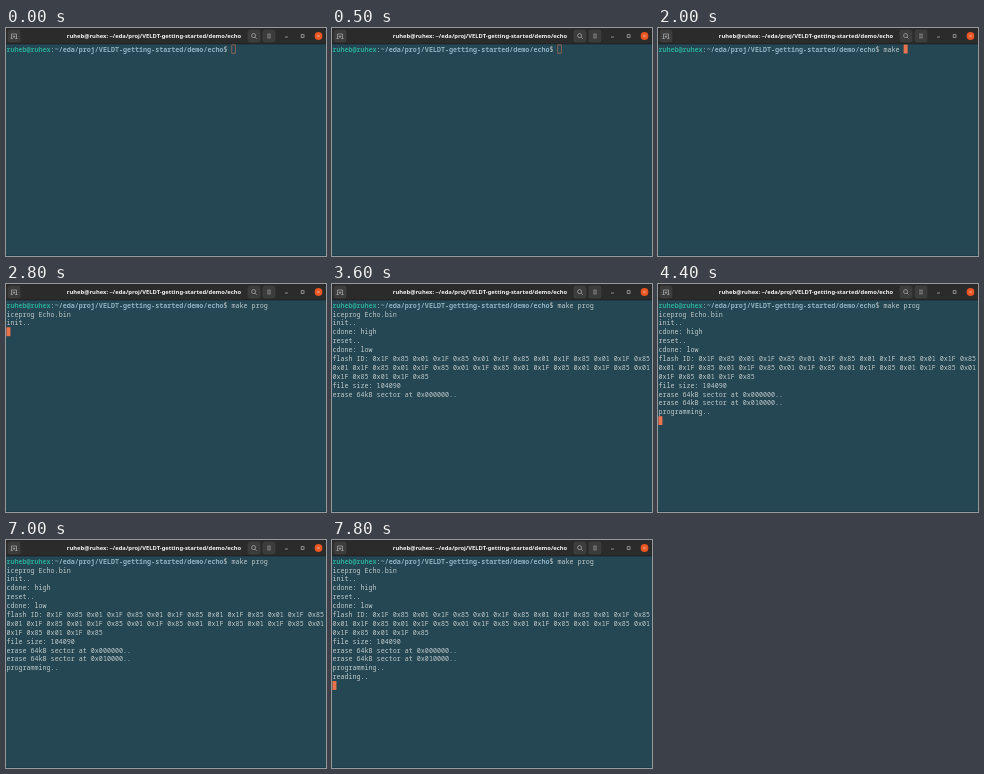
Recreate the animation shown at these times as an HTML page with a canvas. Size 320x228 px, loop 8 s.

```html
<!DOCTYPE html>
<html>
<head>
<meta charset="utf-8">
<style>
  html, body { margin: 0; overflow: hidden; background: #254653; }
  canvas { display: block; }
</style>
</head>
<body>
<canvas id="stage" width="320" height="228"></canvas>
<script>
const ctx = document.getElementById('stage').getContext('2d');
const LOOP = 8000, COLS = 80, CELL = 4.02, ROW = 8.89, LEFT = 0.4, TOP = 16.6;
const SCALE = CELL / 9; // the terminal grid is 9px wide at a 15px font
const MONO = '15px "Noto Sans Mono", monospace';
const USER = 'ruheb@ruhex', PATH = '~/eda/proj/VELDT-getting-started/demo/echo';
const PROMPT_LENGTH = USER.length + PATH.length + 3;
const ids = Array.from({ length: 35 }, (_, i) => ['0x1F', '0x85', '0x01'][i % 3]).join(' ');

// [time, text added to the terminal]
const output = [
  [1300, 'm'], [1500, 'a'], [1600, 'k'], [1800, 'e'], [1900, ' '],
  [2200, 'p'], [2300, 'r'], [2400, 'o'], [2500, 'g'], [2600, ' '],
  [2800, '\niceprog Echo.bin\ninit..\n'],
  [3200, 'cdone: high\nreset..\n'],
  [3600, `cdone: low\nflash ID: ${ids}\nfile size: 104090\nerase 64kB sector at 0x000000..\n`],
  [4000, 'erase 64kB sector at 0x010000..\n'],
  [4400, 'programming..\n'],
  [7700, 'reading..\n']
];

function text(str, x, y, color, font) {
  ctx.save();
  ctx.translate(x, y);
  ctx.scale(SCALE, SCALE);
  ctx.font = font;
  ctx.fillStyle = color;
  ctx.fillText(str, 0, 0);
  ctx.restore();
}

function cells(str, col, row, color = '#bdcaca', weight = '') {
  text(str, LEFT + col * CELL, TOP + row * ROW + 7.1, color, weight + MONO);
}

function line(color, width, ...points) {
  ctx.strokeStyle = color;
  ctx.lineWidth = width;
  ctx.beginPath();
  for (const [x1, y1, x2, y2] of points) {
    ctx.moveTo(x1, y1);
    ctx.lineTo(x2, y2);
  }
  ctx.stroke();
}

function button(x) {
  ctx.beginPath();
  ctx.roundRect(x, 2, 12, 12, 2);
  ctx.fillStyle = '#3c3c3c';
  ctx.fill();
  ctx.strokeStyle = '#464646';
  ctx.lineWidth = 0.5;
  ctx.stroke();
}

function header() {
  ctx.fillStyle = '#2b2b2b';
  ctx.fillRect(0, 0, 320, 16);
  ctx.fillStyle = '#1d1f20';
  ctx.fillRect(0, 15.5, 320, 0.8);
  [2, 242, 257].forEach(button);

  const light = '#b4b4b4';
  line(light, 0.7, [5.5, 10.5, 5.5, 6], [5.5, 6, 10.5, 6], [10.5, 6, 10.5, 10.5],
    [4.5, 10.5, 6.8, 10.5], [9.2, 10.5, 11.5, 10.5], [8, 7.3, 8, 9.9], [6.7, 8.6, 9.3, 8.6]);
  line(light, 0.7, [249.1, 9.1, 250.6, 10.6]);
  ctx.beginPath();
  ctx.arc(247.6, 7.6, 2, 0, 7);
  ctx.stroke();
  line(light, 0.6, [261, 6.2, 265, 6.2], [261, 8, 265, 8], [261, 9.8, 265, 9.8]);
  line(light, 0.7, [279, 9, 282, 9]);
  ctx.strokeRect(295.2, 6.7, 2.8, 2.8);

  ctx.fillStyle = '#e95420';
  ctx.beginPath();
  ctx.arc(312.5, 8, 3.9, 0, 7);
  ctx.fill();
  line('#f3bba6', 0.7, [311.1, 6.6, 313.9, 9.4], [313.9, 6.6, 311.1, 9.4]);

  ctx.textAlign = 'center';
  text(`${USER}: ${PATH}`, 148, 10.2, '#f4f4f4', 'bold 13px "Noto Sans", sans-serif');
  ctx.textAlign = 'left';
}

function cursor(t, col, row) {
  const x = LEFT + col * CELL, y = TOP + row * ROW;
  if (t < 700) {
    ctx.strokeStyle = '#c87258';
    ctx.lineWidth = 0.6;
    ctx.strokeRect(x + 0.3, y + 0.3, CELL - 0.6, ROW - 0.6);
  } else if (t < 2800 || Math.floor((t - 2800) / 600) % 2 === 0) {
    ctx.fillStyle = '#e9734c';
    ctx.fillRect(x, y, CELL, ROW);
  }
}

function draw(t) {
  ctx.fillStyle = '#254653';
  ctx.fillRect(0, 0, 320, 228);
  ctx.fillStyle = '#1f3d4a';
  ctx.fillRect(0, 227, 320, 1);
  header();

  cells(USER, 0, 0, '#2aa893', 'bold ');
  cells(':', USER.length, 0);
  cells(PATH, USER.length + 1, 0, '#8fb2c0', 'bold ');
  cells('$', PROMPT_LENGTH - 2, 0);

  const shown = output.filter(([at]) => at <= t).map(([, str]) => str).join('');
  const rows = (' '.repeat(PROMPT_LENGTH) + shown).split('\n')
    .flatMap(str => str.match(new RegExp(`.{1,${COLS}}`, 'g')) || ['']);
  rows.forEach((str, row) => {
    const col = row ? 0 : PROMPT_LENGTH;
    cells(str.slice(col), col, row);
  });
  cursor(t, rows.at(-1).length, rows.length - 1);
}

const start = performance.now();
function tick() {
  draw((performance.now() - start) % LOOP);
  requestAnimationFrame(tick);
}
tick();
</script>
</body>
</html>
```
